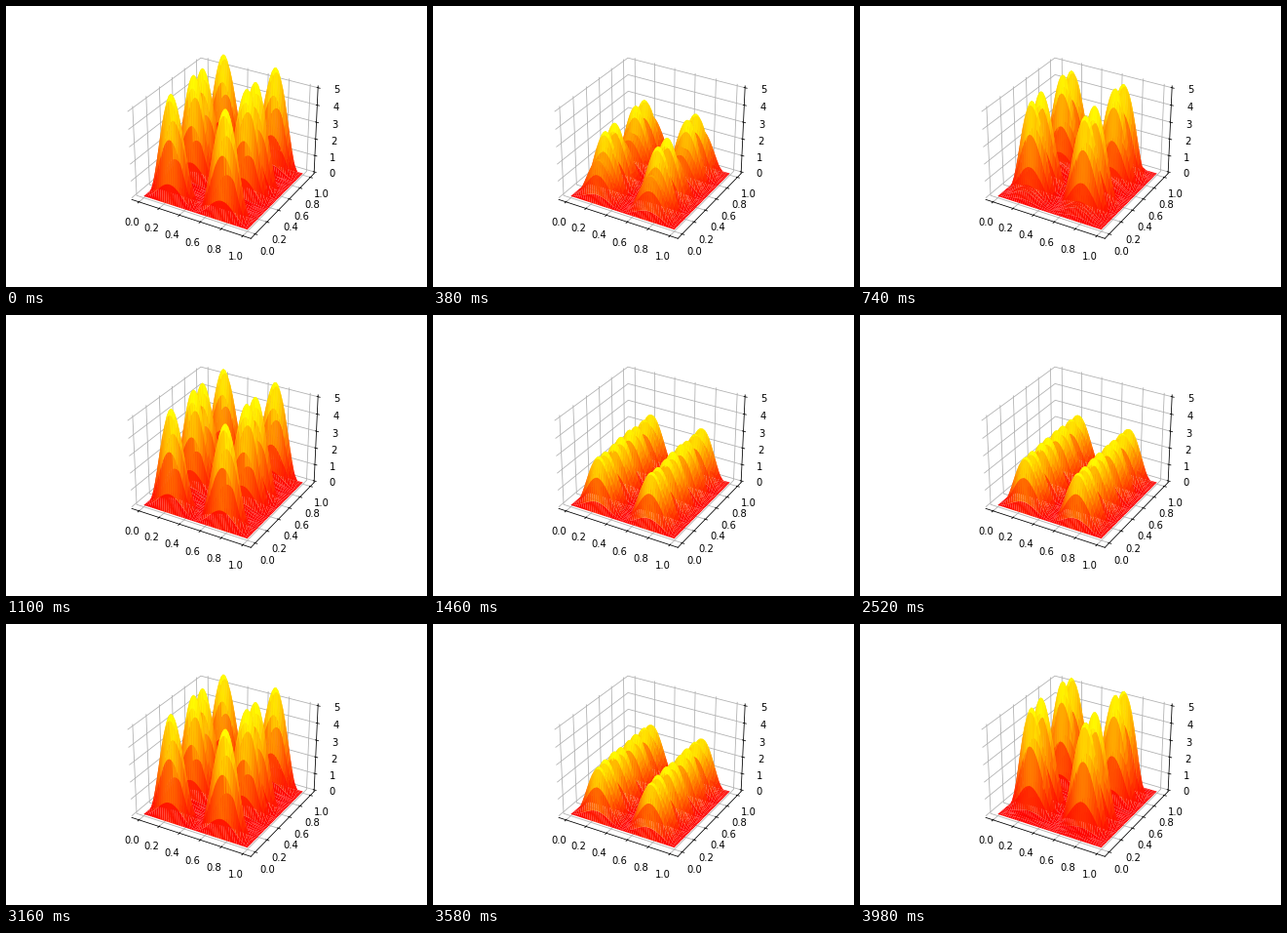
These frames come from a looping animation (432x288 px, 4000 ms). A matplotlib script:

```python
import numpy as np
import matplotlib.pyplot as plt
from matplotlib.animation import FuncAnimation

FRAMES, INTERVAL, DT = 200, 20, 0.001
NX, MODES = 2, (4, 8)
GRID = 50

x, y = np.meshgrid(np.linspace(0, 1, GRID), np.linspace(0, 1, GRID))


def box_state(nx, ny, t):
    """Stationary state of a particle in the unit square (hbar = m = 1)."""
    energy = (nx**2 + ny**2) * np.pi**2 / 2
    return 2 * np.sin(nx * np.pi * x) * np.sin(ny * np.pi * y) * np.exp(-1j * energy * t)


def density(t):
    psi = sum(box_state(NX, ny, t) for ny in MODES) / np.sqrt(len(MODES))
    return np.abs(psi)**2


def quads(z):
    p = np.dstack([x, y, z])
    corners = [p[:-1, :-1], p[:-1, 1:], p[1:, 1:], p[1:, :-1]]
    return np.stack(corners, axis=2).reshape(-1, 4, 3)


def padded(lo, hi):
    pad = (hi - lo) / 48
    return lo - pad, hi + pad


fig = plt.figure(figsize=(6, 4), dpi=72)
fig.subplots_adjust(bottom=0.125)
ax = fig.add_subplot(projection="3d")
surface = ax.plot_surface(x, y, density(0), cmap="autumn", rcount=GRID, ccount=GRID)
ax.set_xlim(padded(-0.05, 1.05))
ax.set_ylim(padded(-0.05, 1.05))
ax.set_zlim(padded(0, 5))
for axis in (ax.xaxis, ax.yaxis, ax.zaxis):
    axis.set_pane_color((1, 1, 1, 0))


def update(frame):
    cells = quads(density(frame * DT))
    surface.set_verts(cells)
    surface.set_array(cells[:, :, 2].mean(axis=1))
    surface.autoscale()
    return surface,


anim = FuncAnimation(fig, update, frames=FRAMES, interval=INTERVAL, repeat=True, repeat_delay=0)
plt.show()
```
